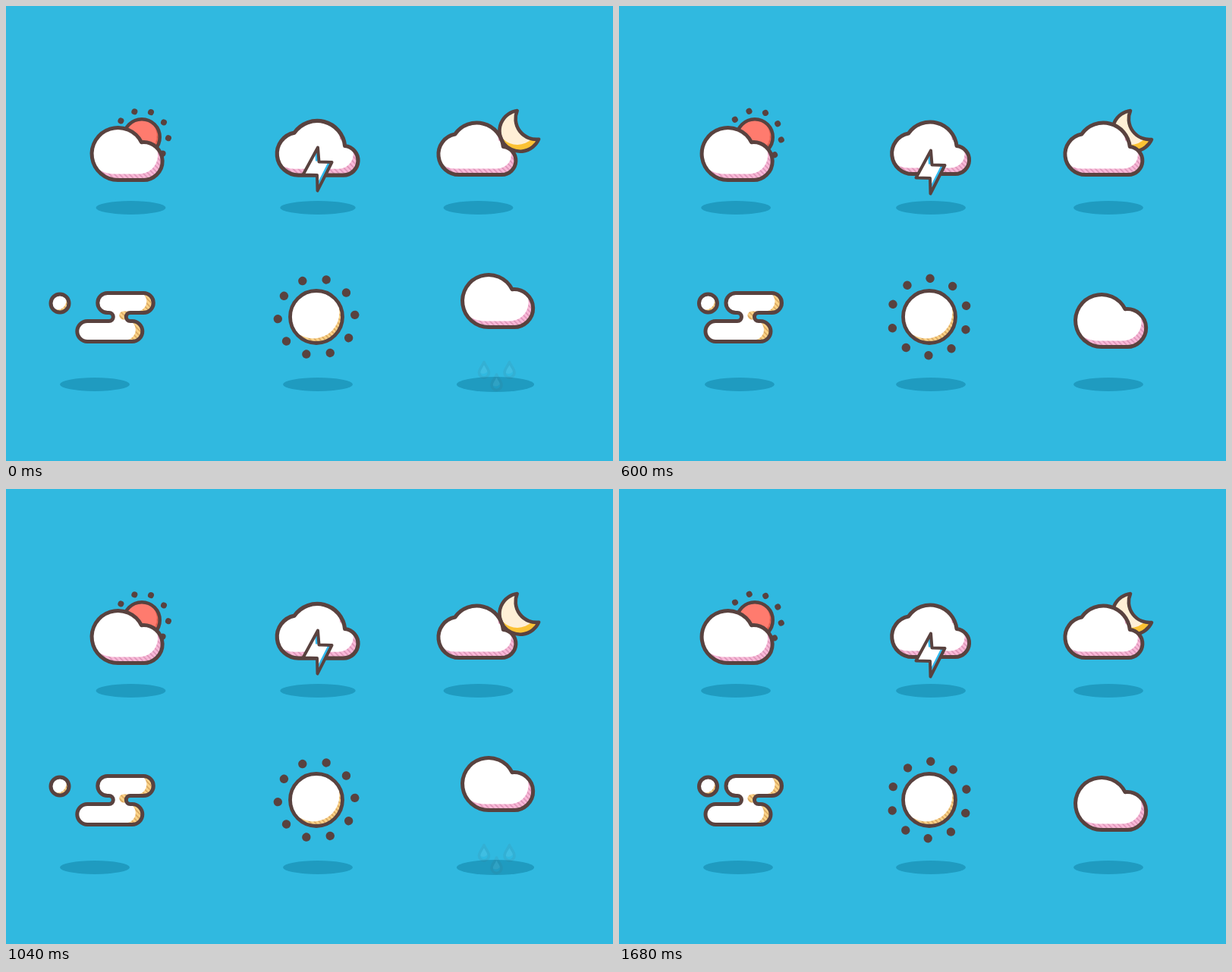
Recreate the animation shown at these times as an HTML page. Size 800 by 600 pixels, loop 1.72 s.

```html
<!DOCTYPE html>
<html lang="en">
<head>
<meta charset="utf-8">
<title>Weather icons</title>
<style>
  html, body { margin: 0; width: 100%; height: 100%; overflow: hidden; background: #30b9e0; }
  svg { display: block; width: 800px; height: 600px; }
  .line { fill: none; stroke: #59423f; stroke-linejoin: round; }
  .dots { fill: #59423f; }
  .shadow { fill: #1f9bc0; }
</style>
</head>
<body>
<svg id="stage" viewBox="0 0 800 600"></svg>
<script>
const LOOP = 1720, CYCLE = 1040, STEP = 40;
const stage = document.getElementById('stage');

// ---- Shapes ----
const disc = r => `M${-r} 0A${r} ${r} 0 1 1 ${r} 0A${r} ${r} 0 1 1 ${-r} 0Z`;
const PUFF = 'M0 34.5A34.5 34.5 0 1 1 31 -15.3A25 25 0 1 1 32 34.5Z';
const CLOUD = 'M-23.5 34.5A27 27 0 0 1 -29.2 -19A35 35 0 0 1 34.3 -2.4A18.5 18.5 0 0 1 32.5 34.5Z';
const BOLT = 'M411 190.5L412.5 209.5L429.5 210L410.5 247.5L410 227L391.5 226.5Z';
const MOON = 'M-3 -26A27 27 0 1 0 25 12A27.4 27.4 0 0 1 -3 -26Z';
const FOG = 'M153 378.5H200.5a13 13 0 0 1 0 26H183a5.5 5.5 0 0 0 0 11H185.5a13.5 13.5 0 0 1 0 27' +
  'H126.5a13.5 13.5 0 0 1 0 -27H155a5.5 5.5 0 0 0 0 -11H153a13 13 0 0 1 0 -26Z';
const DROP = 'M0 -11.5C2 -6 6.5 -2.5 6.5 2.5A6.5 6.5 0 0 1 -6.5 2.5C-6.5 -2.5 -2 -6 0 -11.5Z';

let clips = 0;
// Outlined shape whose light fill is a shifted copy over the shade colour.
function shaded(d, shade, light, dx, dy, width, lit = d) {
  const id = 'clip' + clips++;
  return `<clipPath id="${id}"><path d="${d}"/></clipPath>
    <g clip-path="url(#${id})"><path d="${d}" fill="${shade}"/>
    <path d="${lit}" fill="${light}" transform="translate(${dx} ${dy})"/></g>
    <path class="line" d="${d}" stroke-width="${width}"/>`;
}

const hatch = (id, base, line) => `<pattern id="${id}" width="4.6" height="4.6"
  patternUnits="userSpaceOnUse" patternTransform="rotate(-45)">
  <rect width="4.6" height="4.6" fill="${base}"/><rect width="1.6" height="4.6" fill="${line}"/></pattern>`;

const group = (id, body) => `<g id="${id}">${body}</g>`;

const shadow = id => `<ellipse id="${id}" class="shadow" rx="46" ry="9"/>`;

function ring(id, radius, r) {
  let s = '';
  for (let i = 0; i < 10; i++) {
    const a = i * Math.PI / 5;
    s += `<circle cx="${radius * Math.sin(a)}" cy="${-radius * Math.cos(a)}" r="${r}"/>`;
  }
  return `<g id="${id}" class="dots">${s}</g>`;
}

const drop = (x, y) => `<g transform="translate(${x} ${y})">${shaded(DROP, '#35bbe6', '#fff', -1, -5, 3.6)}</g>`;
const puff = () => shaded(PUFF, 'url(#pink)', '#fff', -6, -8, 5);
const cloud = () => shaded(CLOUD, 'url(#pink)', '#fff', -6, -8, 5);

stage.innerHTML = `<defs>
  ${hatch('pink', '#f9bad8', '#dd93b8')}${hatch('amber', '#fbd388', '#d9a560')}${hatch('coral', '#ee6656', '#d95a4c')}
  </defs>` +
  [1, 2, 3, 4, 5, 6].map(i => shadow('shadow' + i)).join('') +
  ring('redDots', 35, 4) +
  group('redSun', shaded(disc(23.75), 'url(#coral)', '#ff7b6e', -4, -2, 4.5)) +
  group('dayCloud', puff()) +
  group('stormCloud', cloud()) +
  group('bolt', shaded(BOLT, '#30b9ee', '#fff', -4.5, -1, 4)) +
  group('moon', shaded(MOON, '#fcc234', '#ffefd6', -3, -8, 4.6, disc(27))) +
  group('nightCloud', cloud()) +
  group('fog', shaded(FOG, 'url(#amber)', '#fff', -9, -2, 5)) +
  group('ball', shaded(disc(12), 'url(#amber)', '#fff', -3.5, -3.5, 5)) +
  ring('sunDots', 50.8, 5.7) +
  group('sun', shaded(disc(34.5), 'url(#amber)', '#fff', -4, -6, 4.8)) +
  group('rainCloud', puff()) +
  group('drops', drop(630, 445) + drop(646.5, 461.5) + drop(663.5, 445));

// ---- Motion ----
// Periodic monotone cubic through the given keys.
function track(times, values) {
  const n = times.length, at = i => values[(i + n) % n];
  const span = i => { const k = (i + n) % n; return (k === n - 1 ? CYCLE : times[k + 1]) - times[k]; };
  const slope = i => (at(i + 1) - at(i)) / span(i);
  const tangent = i => {
    const a = slope(i - 1), b = slope(i);
    return a * b <= 0 ? 0 : 2 * a * b / (a + b);
  };
  return t => {
    let i = n - 1;
    while (times[i] > t) i--;
    const h = span(i), u = (t - times[i]) / h, v = 1 - u;
    return v * v * (1 + 2 * u) * at(i) + u * u * (3 - 2 * u) * at(i + 1) +
      h * u * v * (v * tangent(i) - u * tangent((i + 1) % n));
  };
}

const KEYS = [0, 240, 320, 400, 640, 760];
const keyed = (...values) => track(KEYS, values);

const dayX = keyed(147.5, 145.7, 145, 144.3, 143.5, 145.2);
const nightX = keyed(621, 629.9, 634.6, 638, 639, 636.8);
const fogX = keyed(-19.2, -9.6, -3.9, 0, 1, -1.7);
const ballX = track([0, 50, 240, 320, 400, 640, 760], [71, 66, 92.5, 106.5, 116, 117.5, 117.5]);
const rainY = track([0, 240, 320, 400, 640, 760, 930], [389, 410, 415, 415, 415, 412.3, 384]);
const dayShadow = keyed(164.5, 160, 158, 156.5, 154, 160);
const nightShadow = keyed(622.5, 633.5, 640, 644.5, 645, 642.5);
const fogShadow = keyed(117, 143.5, 158.5, 168, 157, 152.5);
const rainShadow = track([0, 240, 640, 760, 900], [1.11, 1, 1, 1.08, 1.25]);
const redTurn = keyed(20, 37, 44, 50.5, 60, 56);
const sunTurn = keyed(15, 33.5, 44, 55, 74, 51);
const sunScale = track([0, 660, 760, 820, 860, 1000], [1, 1, 0.36, 0, 0, 1]);
const dotScale = track([0, 640, 720, 920, 1020], [1, 1, 0, 0, 1]);
const dropY = track([0, 20, 640, 760], [36, -8, -8, 0]);
const dropAlpha = track([0, 40, 640, 710, 780, 900], [0.07, 0, 0, 1, 1, 0.75]);

const away = (t, mid) => Math.abs((t - mid + CYCLE * 1.5) % CYCLE - CYCLE / 2);
const pulse = (t, mid, half) => {
  const u = Math.max(0, 1 - away(t, mid) / half);
  return u * u * (3 - 2 * u);
};

const parts = {};
stage.querySelectorAll('[id]').forEach(el => parts[el.id] = el);
function put(id, x, y, sx = 1, sy = sx, turn = 0) {
  parts[id].setAttribute('transform', `translate(${x} ${y}) rotate(${turn}) scale(${sx} ${sy})`);
}

function draw(t) {
  const sun = sunScale(t), dots = dotScale(t), strike = pulse(t, 160, 205), rain = rainShadow(t);

  put('shadow1', dayShadow(t), 266);
  put('redDots', 179, 173, dots, dots, redTurn(t));
  put('redSun', 179, 173, sun);
  put('dayCloud', dayX(t), 195);

  put('shadow2', 411, 266, 1 + 0.64 * strike, 1);
  put('stormCloud', 410.7, 187, 1 + 0.385 * strike);
  put('bolt', 0, -32 * strike);

  put('shadow3', nightShadow(t), 266);
  put('moon', 677, 164, 1, 1, -22 * pulse(t, 205, 230));
  put('nightCloud', nightX(t), 188);

  put('shadow4', fogShadow(t), 499);
  put('fog', fogX(t), 0);
  put('ball', ballX(t), 392);

  put('shadow5', 411, 499, sun);
  put('sunDots', 409, 410, dots, dots, sunTurn(t));
  put('sun', 409, 410, sun);

  put('shadow6', 645, 499, rain);
  put('rainCloud', 636, rainY(t));
  put('drops', 0, dropY(t));
  parts.drops.setAttribute('opacity', dropAlpha(t));
}

function tick() {
  const t = Math.floor(performance.now() % LOOP / STEP) * STEP;
  draw(t % CYCLE);
  requestAnimationFrame(tick);
}
tick();
</script>
</body>
</html>
```
